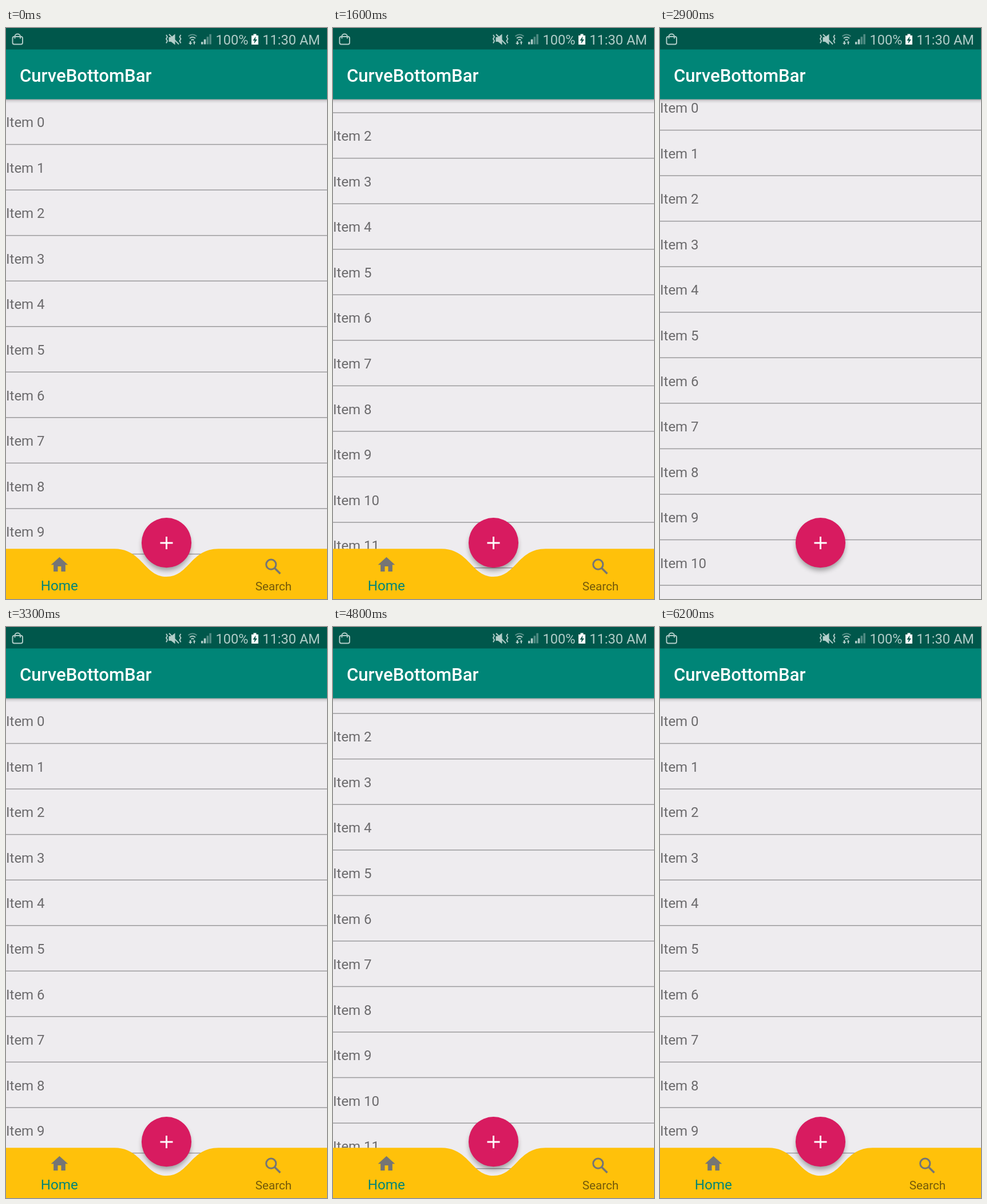
Animation, 561 px wide and 998 px high, one loop 8 s. Source, as an HTML page:

```html
<!DOCTYPE html>
<html lang="en">
<head>
<meta charset="utf-8">
<title>Curved bottom bar</title>
<style>
html, body { margin: 0; width: 100%; height: 100%; overflow: hidden; background: #eeecef; }
svg { display: block; width: 561px; height: 998px; font-family: Roboto, sans-serif; }
</style>
</head>
<body>
<svg viewBox="0 0 561 998">
  <defs>
    <filter id="soft" x="-30%" y="-30%" width="160%" height="160%"><feGaussianBlur stdDeviation="5"/></filter>
    <linearGradient id="edge" x2="0" y2="1">
      <stop offset="0" stop-opacity=".34"/>
      <stop offset=".4" stop-opacity=".1"/>
      <stop offset="1" stop-opacity="0"/>
    </linearGradient>
  </defs>
  <rect width="561" height="998" fill="#eeecef"/>
  <g id="list" font-size="24" fill="#6c6b6d"></g>

  <g id="bar">
    <path id="curve" fill="#ffc10a"/>
    <path transform="translate(75.7 920.4) scale(1.48)" fill="#757575" d="M10 20v-6h4v6h5v-8h3L12 3 2 12h3v8z"/>
    <text x="93.3" y="982.5" font-size="24.2" text-anchor="middle" fill="#008577">Home</text>
    <g fill="none" stroke="#757575" stroke-width="3">
      <circle cx="463.3" cy="937.7" r="8.6"/>
      <path d="M469.5 944l9.8 9.8" stroke-width="3.4"/>
    </g>
    <text x="467.5" y="982.5" font-size="20.7" text-anchor="middle" fill="#755a0a">Search</text>
  </g>

  <circle cx="280.5" cy="906" r="42" opacity=".36" filter="url(#soft)"/>
  <circle cx="280.5" cy="899.7" r="43.6" fill="#d81b60"/>
  <path d="M280.5 889v22M269.5 900h22" stroke="#fff" stroke-width="3"/>

  <rect y="124" width="561" height="8" fill="url(#edge)"/>
  <rect y="37" width="561" height="87.5" fill="#008577"/>
  <rect width="561" height="37.5" fill="#00574b"/>
  <text x="24" y="93.5" font-size="31.1" font-weight="500" fill="#fff">CurveBottomBar</text>

  <g fill="#b2cdc9" font-size="23.6">
    <text x="366.5" y="28.5">100%</text>
    <text x="448.3" y="28.5">11:30 AM</text>
    <path d="M284.5 16h4l7-5.5v19l-7-5.5h-4z"/>
    <path d="M429 13h3.500v-2.500h5v2.500h3.500v16h-12z" fill="#fff"/>
    <path d="M436.500 14.500l-5 7.500h3l-1 5.500 5.500-7.500h-3.200z" fill="#00574b"/>
    <g id="signal"></g>
    <path d="M321 23v3h-2l3.300 3.500 3.200-3.500h-2v-3zM328 28.500v-3h-1.500l2.500-3 2.500 3h-1.500v3z"/>
    <g fill="none" stroke="#b2cdc9" stroke-width="1.9">
      <rect x="11.5" y="15" width="17.5" height="13.5" rx="3"/>
      <path d="M15.500 18.500v-4a4.700 4 0 0 1 9.400 0v4"/>
      <path d="M285 11l17 17.500M280 12l2 3.500-2 3.500 2 3.500-2 4M305.500 12l-2 3.500 2 3.500-2 3.500 2 4"/>
      <path d="M318.500 14.500q7.500-6 15 0" opacity=".5"/>
      <path d="M321 18q5-4 10 0M323.500 21.300q2.500-2 5 0"/>
    </g>
  </g>
</svg>
<script>
const LOOP = 8000, STEP = 100, ROW = 79.55, BAR_H = 88, SLIDE = 300;
const $ = id => document.getElementById(id);
const repeat = (n, part) => Array.from({ length: n }, (_, i) => part(i)).join('');

// Notch: two mirrored cubic curves sized from one radius.
function curvePath(cx, top, r) {
  const x = r * 7 / 3, reach = r * 1.25, low = top + reach;
  return `M0 ${top}H${cx - x}C${cx - x + reach} ${top} ${cx - r} ${low} ${cx} ${low}` +
    `C${cx + r} ${low} ${cx + x - reach} ${top} ${cx + x} ${top}H561V1000H0Z`;
}
$('curve').setAttribute('d', curvePath(280.5, 910.3, 39));

$('list').innerHTML = repeat(16, i => {
  const y = 124.5 + i * ROW;
  return `<text y="${y + 48.7}">Item ${i}</text>` +
    `<rect y="${y + 78.3}" width="561" height="1.5" fill="#9b9a9c"/>`;
});

$('signal').innerHTML = repeat(4, i => {
  const h = 4.2 + i * 4.5;
  return `<rect x="${341 + i * 4.8}" y="${28.5 - h}" width="3.5" height="${h}" opacity="${i < 2 ? 1 : .45}"/>`;
});

// Each swipe flings the list; once it slows down, the bar slides away or back.
const swipes = [
  { start: 1249, time: 451, dist: 142, slide: 1600 },
  { start: 2550, time: 603, dist: -142, slide: 3000 },
  { start: 4279, time: 685, dist: 140, slide: 4800 },
  { start: 5650, time: 500, dist: -140, slide: 5900 }
];
const part = (t, from, time) => Math.min(1, Math.max(0, (t - from) / time));
const fling = k => 1 - (1 - k) ** 2;
const smooth = k => (1 - Math.cos(Math.PI * k)) / 2;
const shift = (id, y) => $(id).setAttribute('transform', `translate(0 ${y})`);

function draw(now) {
  const t = Math.floor(now % LOOP / STEP) * STEP;
  let scroll = 0, hidden = 0;
  for (const s of swipes) {
    scroll += s.dist * fling(part(t, s.start, s.time));
    hidden += Math.sign(s.dist) * smooth(part(t, s.slide, SLIDE));
  }
  shift('list', -scroll);
  shift('bar', hidden * BAR_H);
}

const begin = performance.now();
function tick() {
  draw(performance.now() - begin);
  requestAnimationFrame(tick);
}
tick();
</script>
</body>
</html>
```
